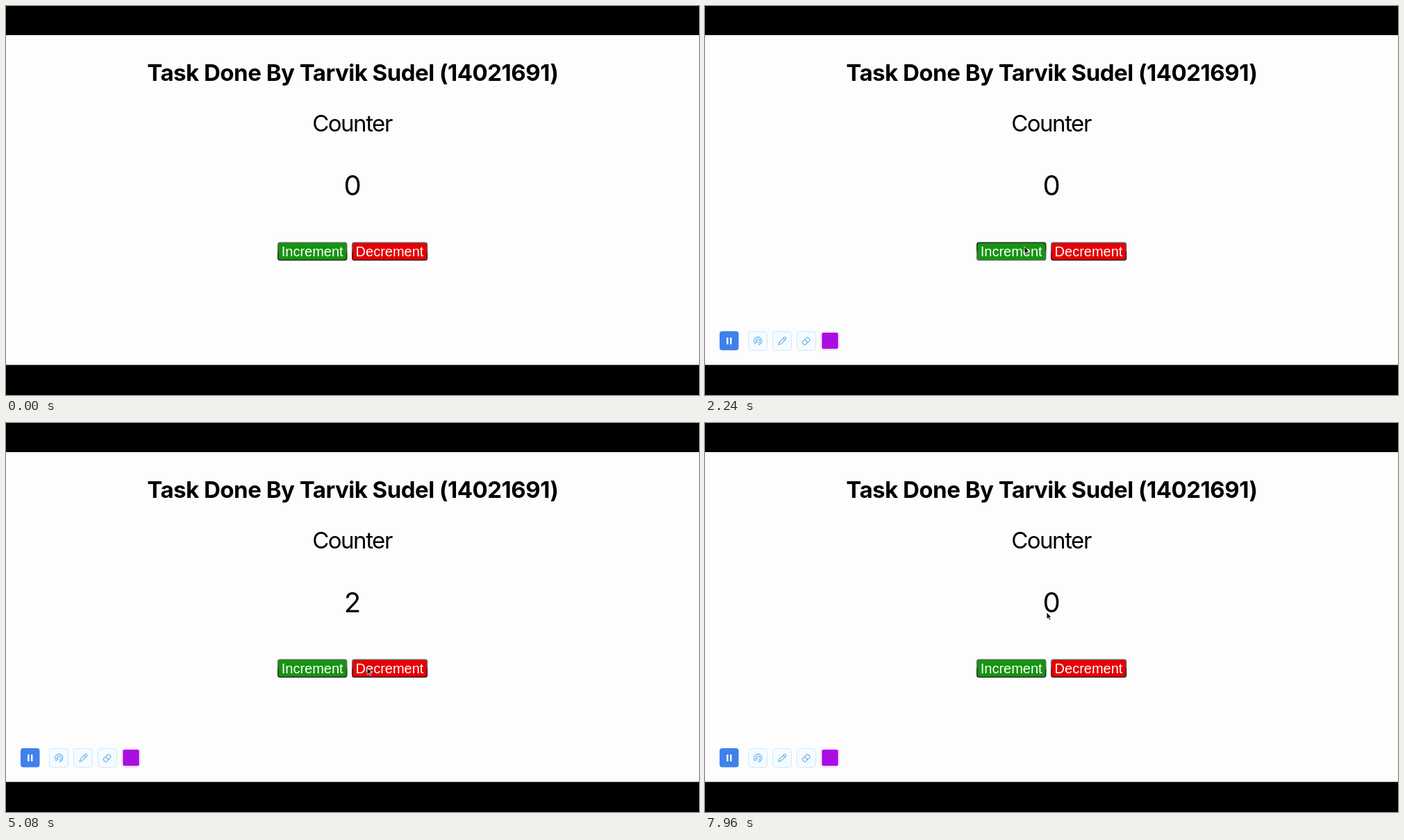
An HTML page for the animation above (8 s loop, 998x561 px).

```html
<!DOCTYPE html>
<html lang="en">
<head>
<meta charset="utf-8">
<title>Counter</title>
<style>
  html, body { margin: 0; width: 100%; height: 100%; overflow: hidden; background: #000; }
  svg { display: block; }
  text { font-family: Inter, sans-serif; font-optical-sizing: none; text-anchor: middle; }
  .title { font-size: 33px; font-weight: 700; letter-spacing: -.015em; text-anchor: start; }
  .label { font-size: 33px; letter-spacing: -.045em; }
  .value { font-size: 40px; }
  .button rect { stroke: url(#raised); stroke-width: 1.5; }
  .button.pressed rect { stroke: url(#sunken); }
  .button text { fill: #fff; font: 20px "Liberation Sans", Arial, sans-serif; }
  .tool { fill: #f5fbff; stroke: #cde8fd; }
  .icon { fill: none; stroke: #58aeea; stroke-width: 1.1; stroke-linecap: round; stroke-linejoin: round; }
</style>
</head>
<body>
<svg width="998" height="561">
  <defs>
    <linearGradient id="raised" x2="0" y2="1">
      <stop offset=".4" stop-color="#666"/><stop offset=".6" stop-color="#2a2a2a"/>
    </linearGradient>
    <linearGradient id="sunken" x2="0" y2="1">
      <stop offset=".4" stop-color="#2a2a2a"/><stop offset=".6" stop-color="#666"/>
    </linearGradient>
  </defs>
  <rect y="42" width="998" height="475.6" fill="#fdfdfd"/>
  <text class="title" x="203.3" y="108">Task Done By Tarvik Sudel (14021691)</text>
  <text class="label" x="498.5" y="180.5">Counter</text>
  <text class="value" id="value" x="499" y="273">0</text>
  <g class="button" id="increment">
    <rect x="391.7" y="341.2" width="99" height="25.3" rx="3" fill="#149410"/>
    <text x="441.2" y="361">Increment</text>
  </g>
  <g class="button" id="decrement">
    <rect x="498.7" y="341.2" width="107.8" height="25.3" rx="3" fill="#e60005"/>
    <text x="552.5" y="361">Decrement</text>
  </g>
  <g id="toolbar">
    <rect x="21" y="469" width="27.5" height="27.5" rx="4" fill="#4080ec"/>
    <path d="M32.3 478v10M37.2 478v10" stroke="#fff" stroke-width="2.4"/>
    <rect class="tool" x="62.5" y="469.5" width="27" height="27" rx="4"/>
    <rect class="tool" x="97.5" y="469.5" width="27" height="27" rx="4"/>
    <rect class="tool" x="132.5" y="469.5" width="27" height="27" rx="4"/>
    <rect x="166.5" y="469.5" width="27" height="27" rx="4" fill="#fff" stroke="#e5d9f5"/>
    <rect x="168.3" y="471" width="23.5" height="23.6" rx="2.5" fill="#aa0ee2"/>
    <g class="icon">
      <path d="M71.5 486a5.6 5.6 0 1 1 5.5 2.6M73.8 484.5a3 3 0 1 1 3.2 1.8M76 483l-4 4.5"/>
      <path d="M106 488.5l1-3.7 6.7-6.7a1.5 1.5 0 0 1 2.5 2.5l-6.7 6.7zM112.4 479.4l2.5 2.5"/>
      <path d="M140.5 484.2l6-6q1-.8 2 0l2.2 2.2q.8 1 0 2l-6 6q-1 .8-2 0l-2.2-2.2q-.8-1 0-2zM143.5 481.2l4.2 4.2"/>
    </g>
  </g>
  <path id="cursor" d="M0 0V9.8L2.3 7.8 3.9 11.3 5.6 10.5 4 7.1H7z" fill="#111" stroke="#fff" stroke-width=".7"/>
</svg>
<script>
  const LOOP = 8000, TOOLBAR_AT = 560, PRESS = 100;

  // Pointer stops: time, x, y
  const path = [
    [560, 640, 120], [1040, 572, 183], [1400, 560, 220], [1960, 460, 347],
    [3560, 460, 348], [4040, 491, 348], [4360, 520, 353], [5440, 520, 353],
    [6200, 83, 123], [6520, 90, 140], [7120, 522, 352], [7480, 522, 352], [7960, 492, 273]
  ];

  // Button releases: time, button, step
  const clicks = [
    [2280, "increment", 1], [2640, "increment", 1], [3000, "increment", 1], [3360, "increment", 1],
    [4600, "decrement", -1], [4960, "decrement", -1], [5320, "decrement", -1], [7360, "decrement", -1]
  ];

  const el = id => document.getElementById(id);
  const show = (id, visible) => el(id).setAttribute("visibility", visible ? "visible" : "hidden");

  function pointerAt(t) {
    const next = path.findIndex(stop => stop[0] > t);
    if (next < 0) return path[path.length - 1].slice(1);
    if (next === 0) return path[0].slice(1);
    const [t0, x0, y0] = path[next - 1], [t1, x1, y1] = path[next];
    const u = (t - t0) / (t1 - t0), k = u * u * (3 - 2 * u);
    return [x0 + (x1 - x0) * k, y0 + (y1 - y0) * k];
  }

  function draw(now) {
    const t = Math.floor(now % LOOP / 40) * 40;
    el("value").textContent = clicks.reduce((sum, [at, , step]) => sum + (t >= at ? step : 0), 0);
    for (const id of ["increment", "decrement"]) {
      const pressed = clicks.some(([at, button]) => button === id && t >= at - PRESS && t < at);
      el(id).classList.toggle("pressed", pressed);
    }
    show("toolbar", t >= TOOLBAR_AT);
    show("cursor", t >= TOOLBAR_AT);
    el("cursor").setAttribute("transform", `translate(${pointerAt(t)})`);
    requestAnimationFrame(draw);
  }
  draw(0);
</script>
</body>
</html>
```
